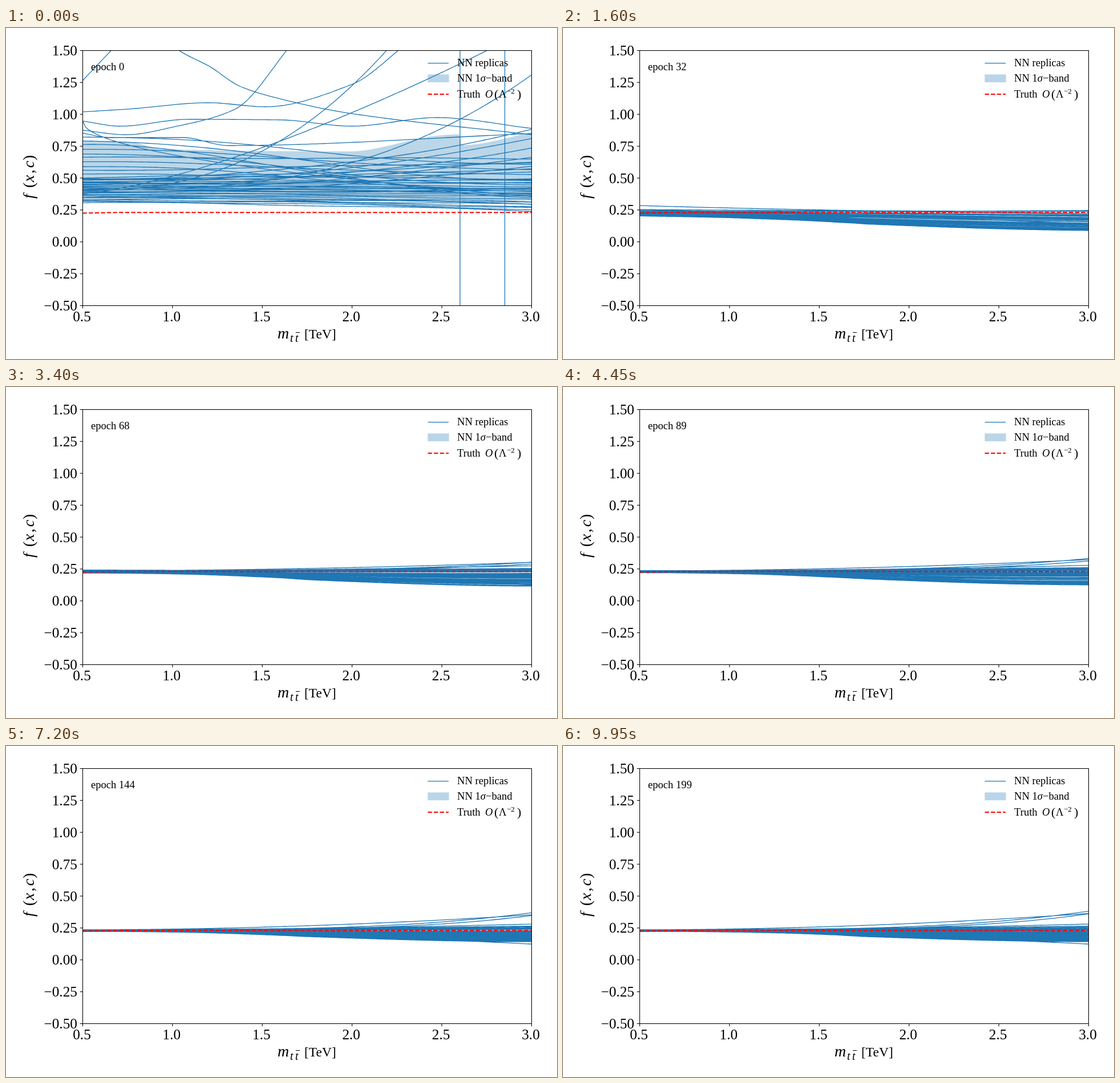
An HTML page for the animation above (10 s loop, 966 by 580 pixels).

```html
<!DOCTYPE html>
<html lang="en">
<head>
<meta charset="utf-8">
<title>Replica training</title>
<style>
  html, body { margin: 0; width: 100%; height: 100%; overflow: hidden; background: #fff; }
  svg { display: block; width: 966px; height: 580px; }
  text { font-family: "Liberation Serif", "Times New Roman", serif; fill: #000; }
  .tick { font-size: 25.3px; }
  .small { font-size: 18.6px; }
  .i { font-style: italic; }
  .axis { fill: none; stroke: #000; stroke-width: 1.07; }
  .curve { fill: none; stroke: #1f77b4; stroke-width: 1.3; stroke-linejoin: round; }
  .band { fill: #1f77b4; stroke: #1f77b4; stroke-width: 1.3; opacity: .3; }
  .truth { fill: none; stroke: #f00; stroke-width: 2; stroke-dasharray: 7.4 3.2; }
</style>
</head>
<body>
<svg viewBox="0 0 966 580">
  <defs><clipPath id="plot"><rect x="134.5" y="39.5" width="787" height="447"/></clipPath></defs>
  <g clip-path="url(#plot)">
    <path id="band" class="band"/>
    <path id="lines" class="curve"/>
    <path id="poles" class="curve" d="M796 39V487M874.5 39V487"/>
    <path class="truth" d="M134.5 324.4L200 323.2H921.5"/>
  </g>
  <g id="axes"><rect class="axis" x="134.5" y="39.5" width="787" height="447"/></g>

  <text id="epoch" class="small" x="149" y="74"></text>

  <path class="curve" d="M739.5 61.7H776"/>
  <rect class="band" x="740" y="82" width="36" height="12.5"/>
  <path class="truth" d="M739.5 116H776"/>
  <g class="small">
    <text x="791" y="67">NN replicas</text>
    <text x="791" y="94">NN 1<tspan class="i">σ</tspan>−band</text>
    <text x="791" y="122">Truth</text>
    <text x="840" y="122" class="i">O</text>
    <text x="856" y="123" font-size="22">(</text>
    <text x="864" y="122">Λ</text>
    <text x="878" y="115" font-size="13">−2</text>
    <text x="896" y="123" font-size="22">)</text>
  </g>

  <g>
    <text class="i" x="476" y="544" font-size="28">m</text>
    <text class="i" x="498" y="550" font-size="20">t</text>
    <text class="i" x="507" y="550" font-size="20">t</text>
    <path class="axis" d="M508 533.5H515"/>
    <text x="523" y="544" font-size="23.5">[TeV]</text>
  </g>
  <g transform="translate(49 302) rotate(-90)" font-size="28">
    <text class="i" x="3">f</text>
    <text x="22">(</text>
    <text class="i" x="32">x</text>
    <text x="47">,</text>
    <text class="i" x="57">c</text>
    <text x="70">)</text>
  </g>
</svg>
<script>
const $ = id => document.getElementById(id);
const X0 = 134.5, W = 787, N = 160;
const ss = Array.from({ length: N + 1 }, (_, i) => i / N);
const xs = ss.map(s => X0 + W * s);
const mix = (a, b, t) => a + (b - a) * t;
const blend = (a, b, t) => a.map((v, i) => mix(v, b[i], t));
const smooth = t => t * t * (3 - 2 * t);

let seed = 11;
const rand = () => (seed = seed * 16807 % 2147483647) / 2147483647;

function drawAxes() {
  let svg = '';
  for (let i = 0; i < 6; i++) {
    const x = X0 + i * W / 5;
    svg += `<path class="axis" d="M${x} 486.5v4.8"/>
      <text class="tick" text-anchor="middle" x="${x - 1.5}" y="514">${(0.5 + i / 2).toFixed(1)}</text>`;
  }
  for (let i = 0; i < 9; i++) {
    const y = 39.5 + i * 55.875, v = 1.5 - i / 4;
    svg += `<path class="axis" d="M134.5 ${y}h-4.8"/>
      <text class="tick" text-anchor="end" x="125" y="${y + 8.5}">${v < 0 ? '−' : ''}${Math.abs(v).toFixed(2)}</text>`;
  }
  $('axes').insertAdjacentHTML('beforeend', svg);
}

// Monotone cubic through x, y, x, y, ..., sampled on xs.
function spline(...p) {
  const n = p.length / 2, px = i => p[2 * i], py = i => p[2 * i + 1];
  const s = i => (py(i + 1) - py(i)) / (px(i + 1) - px(i));
  const m = i => {
    if (i === 0) return s(0);
    if (i === n - 1) return s(n - 2);
    const a = s(i - 1), b = s(i);
    return a * b <= 0 ? 0 : 2 * a * b / (a + b);
  };
  let k = 0;
  return xs.map(x => {
    while (k < n - 2 && x > px(k + 1)) k++;
    const h = px(k + 1) - px(k), t = Math.min(1, (x - px(k)) / h), u = 1 - t;
    return u * u * (1 + 2 * t) * py(k) + t * t * (3 - 2 * t) * py(k + 1)
      + h * t * u * (u * m(k) - t * m(k + 1));
  });
}

const power = (l, r, p) => ss.map(s => mix(l, r, s ** p));

function wavy(l, r, ease) {
  const phase = rand() * 6.3, amp = 0.5 + rand();
  return ss.map(s => mix(l, r, ease(s)) + amp * Math.sin(s * 10 + phase));
}

// Untrained replicas; the first five stay strays later on.
const start = [
  power(92, -740, 1),
  spline(134, 179, 210, 187, 300, 172, 400, 143, 492, 39, 560, -60),
  spline(134, -120, 303, 39, 358, 68, 410, 102, 480, 124, 606, 150, 922, 187),
  spline(134, 163, 200, 172, 320, 160, 480, 161, 606, 172, 755, 157, 922, 176),
  spline(134, 147, 215, 142, 355, 131, 455, 138, 606, 99, 688, 39, 750, -20),
  spline(134, 184, 180, 192, 310, 192, 390, 206, 922, 185),
  power(290, 0, 1.4),
  power(285, -342, 2.4),
  power(284, 82, 2.8),
  power(163, 295, 0.5)
];
for (let i = 0; i < 5; i++) start.push(wavy(264 + 6 * i, 178 + 16 * i, t => t ** 2.1));
for (let i = 0; i < 10; i++) start.push(wavy(190 + 7.4 * i, 225 + 75 * ((i * 0.37 + 0.2) % 1), smooth));
for (let u = 0; u < 1.01; u += 1 / 26) {
  start.push(wavy(262 + 44 * u, 250 + 71 * u + (1 - u) * (rand() - 0.5) * 30, t => t ** 1.7));
}
const startTop = spline(134, 198, 220, 201, 275, 213, 600, 217, 760, 189, 795, 187, 799, 206, 922, 184);
const startBottom = power(299, 302, 1);

// Left offset with its decay and falloff; right end, its surplus, decay and bend.
const stray = (off, offTau, fall, end, extra, tau, bend) => a => ss.map(s =>
  322 + off * Math.exp(-a / offTau) * (1 - s) ** fall
  + (end - 322 + extra * Math.exp(-a / tau)) * s ** bend);
const strays = [
  stray(-32, 9.5, 1.3, 292, 42, 55, 1.9),
  stray(-33, 18, 2.2, 288, 58, 50, 3.5),
  stray(-8, 20, 1, 347, -14, 15, 1.5),
  stray(-4, 20, 1, 292, 46, 60, 4),
  stray(0, 20, 1, 312, 21, 20, 2)
];

// The dense bundle after a epochs of settling.
function bundle(a) {
  const decay = tau => Math.exp(-a / tau);
  const topEnd = 315.5 + 30 * decay(22), lowEnd = 342 + 19 * decay(60);
  const lowStart = 325 + 9.5 * decay(25);
  return {
    top: power(322 - 2 * decay(30), topEnd, 1.5),
    bottom: ss.map(s => mix(lowStart, lowEnd, mix(smooth(s), s * (1.5 - s / 2), decay(25))))
  };
}

const ranks = start.map((_, i) => ({ l: rand(), r: i * 0.618 % 1, phase: rand() * 6.3 }));
const points = ys => ys.map((y, i) => xs[i].toFixed(1) + ' ' + y.toFixed(2));

function render(e) {
  const a = Math.max(0, e - 12), left = Math.max(0, 1 - e / 12) ** 1.7;
  const { top, bottom } = bundle(a);
  const lines = start.map((from, k) => {
    const { l, r, phase } = ranks[k], drift = 0.04 * Math.sin(e * 0.09 + phase);
    const goal = strays[k] ? strays[k](a) : ss.map((s, i) => {
      const q = mix(l, r, Math.min(1, s * 2)) + drift;
      return mix(top[i], bottom[i], Math.min(1, Math.max(0, q)));
    });
    return 'M' + points(blend(goal, from, left)).join('L');
  });
  $('lines').setAttribute('d', lines.join(''));

  const edge = (q, from) => points(blend(blend(top, bottom, q), from, left));
  const outline = [...edge(0.16, startTop), ...edge(0.84, startBottom).reverse()];
  $('band').setAttribute('d', 'M' + outline.join('L') + 'Z');
  $('poles').style.display = e ? 'none' : '';
  $('epoch').textContent = 'epoch ' + e;
}

let shown = -1;
function tick() {
  const e = Math.floor(performance.now() % 10000 / 50);
  if (e !== shown) render(shown = e);
  requestAnimationFrame(tick);
}
drawAxes();
tick();
</script>
</body>
</html>
```
